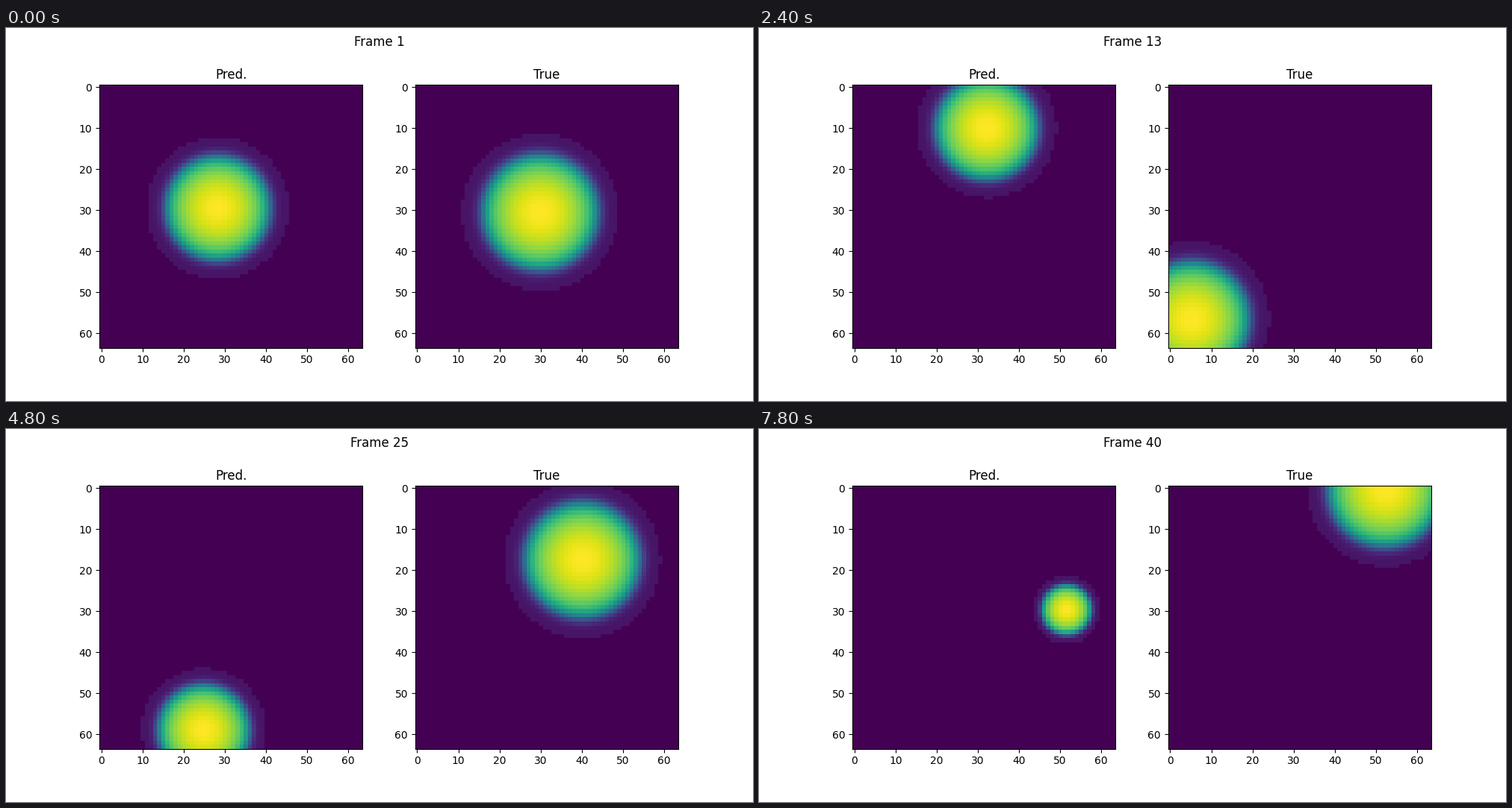
Recreate the animation shown at these times as a matplotlib script. Size 1000 px wide and 500 px high, loop 8000 ms.

```python
import numpy as np
import matplotlib.pyplot as plt
from matplotlib.animation import FuncAnimation

SIZE = 64
STEPS = 40
INTERVAL = 200
TRUE_RADIUS = 19

# Turning points (step, position) of the predicted ball.
PRED_X = [(-4, 5.5), (6, 51), (18, 21), (21, 48), (28.5, 6), (38.3, 57), (44, 30)]
PRED_Y = [(-4, 54), (6, 5), (10.5, 17), (14.5, 7), (26.5, 61), (30, 38),
          (35, 53.5), (43, 19)]

rows, cols = np.mgrid[:SIZE, :SIZE]


def swing(turns, step):
    """Ease in and out from one turning point to the next."""
    for (t0, a), (t1, b) in zip(turns, turns[1:]):
        if step <= t1:
            return a + (b - a) * (1 - np.cos(np.pi * (step - t0) / (t1 - t0))) / 2


def bounce(start, speed, t):
    """Position between the walls, mirrored at each hit."""
    wall = SIZE - 1
    return wall - abs((start + speed * t) % (2 * wall) - wall)


def ball(x, y, radius):
    """Domed disc with a soft edge and a faint rim."""
    d = np.hypot(cols - x, rows - y) / radius
    dome = (1 - 0.8 * d ** 2) / (1 + np.exp((d - 0.755) / 0.045))
    return np.where(d < 1, 0.05 + 0.95 * dome, 0)


def pred_field(step):
    radius = 17.2 - 9 * ((step - 1) / (STEPS - 1)) ** 3
    return ball(swing(PRED_X, step), swing(PRED_Y, step), radius)


def true_field(step):
    t = step - 1
    return ball(bounce(29.8, 7.59, t), bounce(-30.5, 7.25, t), TRUE_RADIUS)


fig, axes = plt.subplots(1, 2, figsize=(10, 5), dpi=100)
heading = fig.suptitle("Frame 1")
fields = (pred_field, true_field)
images = []
for ax, name, field in zip(axes, ("Pred.", "True"), fields):
    images.append(ax.imshow(field(1), cmap="viridis", vmin=0, vmax=1))
    ax.set_title(name)
    ax.set_xticks(range(0, SIZE, 10))
    ax.set_yticks(range(0, SIZE, 10))


def update(index):
    step = index + 1
    heading.set_text(f"Frame {step}")
    for image, field in zip(images, fields):
        image.set_data(field(step))
    return [heading, *images]


anim = FuncAnimation(fig, update, frames=STEPS, interval=INTERVAL,
                     repeat=True, repeat_delay=0, blit=False)
plt.show()
```
